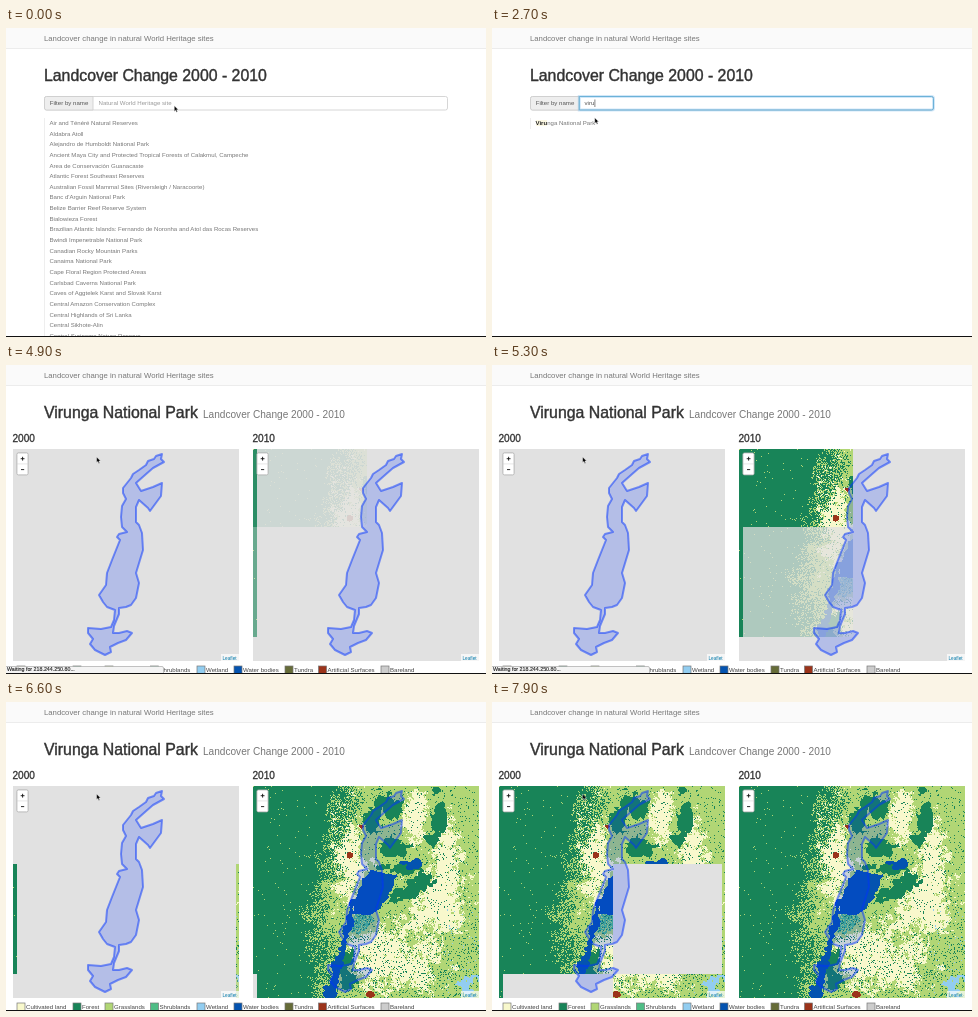
Recreate the animation shown at these times as an HTML page with a canvas. Size 480 by 309 pixels, loop 8 s.

```html
<!DOCTYPE html>
<html lang="en">
<head>
<meta charset="utf-8">
<title>Landcover change</title>
<style>
html, body { margin: 0; width: 100%; height: 100%; overflow: hidden; background: #fff; }
#stage { position: absolute; left: 0; top: 0; width: 480px; height: 309px; overflow: hidden; background: #fff; }
#stage, text { font-family: "Liberation Sans", Arial, sans-serif; }
svg { position: absolute; left: 0; top: 0; overflow: hidden; }
.title { font-size: 15.85px; fill: #333; stroke: #333; stroke-width: .4px; }
.sub { font-size: 10.1px; fill: #777; }
.year { font-size: 10.1px; fill: #333; stroke: #333; stroke-width: .3px; }
.nav { font-size: 7.76px; fill: #777; }
.small { font-size: 6.1px; fill: #444; }
#list { position: absolute; left: 38px; top: 90px; padding-left: 4.5px; border-left: 1px solid #eee;
  font-size: 6.05px; line-height: 10.65px; color: #777; white-space: nowrap; }
#list div { height: 10.65px; }
#list mark { font-weight: bold; color: #222; background: #fcf8e3; }
.map { position: absolute; top: 84px; width: 226px; height: 212px; background: #e1e1e1; overflow: hidden; }
.map canvas { position: absolute; left: 0; top: 0; }
</style>
</head>
<body>
<div id="stage">
  <svg id="nav" width="480" height="309">
    <rect width="480" height="20.5" fill="#fafafa"/>
    <rect y="20" width="480" height="1" fill="#ececec"/>
    <text class="nav" x="38" y="12.8">Landcover change in natural World Heritage sites</text>
  </svg>

  <div id="search">
    <svg width="480" height="309">
      <text class="title" x="38" y="52.5">Landcover Change 2000 - 2010</text>
      <rect x="38.5" y="68.5" width="403" height="13.5" rx="2" fill="#fff" stroke="#ccc" stroke-width=".8"/>
      <path d="M87 68.5H40.5a2 2 0 0 0-2 2v9.500a2 2 0 0 0 2 2H87z" fill="#eee" stroke="#ccc" stroke-width=".8"/>
      <text class="small" x="43.7" y="77.400" style="fill:#555">Filter by name</text>
      <g id="focus" fill="none">
        <path d="M87.300 68.500H439.500a2 2 0 0 1 2 2v9.500a2 2 0 0 1-2 2H87.300z" stroke="#66afe9" stroke-opacity=".3" stroke-width="3"/>
        <path d="M87.300 68.500H439.500a2 2 0 0 1 2 2v9.500a2 2 0 0 1-2 2H87.300z" stroke="#6cb2d8"/>
      </g>
      <text id="field" class="small" x="92.500" y="77.400"></text>
      <rect id="caret" y="71.500" width=".6" height="7.500" fill="#333"/>
    </svg>
    <div id="list"></div>
  </div>

  <div id="detail">
    <svg width="480" height="309">
      <text class="title" x="38" y="52.5">Virunga National Park</text>
      <text class="sub" x="197" y="52.5">Landcover Change 2000 - 2010</text>
      <text class="year" x="6.5" y="77.300">2000</text>
      <text class="year" x="246.500" y="77.300">2010</text>
      <g id="legend"></g>
    </svg>
    <div id="maps"></div>
  </div>

  <svg width="480" height="309">
    <g id="status">
      <rect x="-2" y="301.500" width="159.500" height="9" rx="1.500" fill="#f4f4f4" stroke="#aaa" stroke-width=".7"/>
      <text x="1" y="306.300" font-size="5.3" fill="#222" stroke="#222" stroke-width=".12">Waiting for 218.244.250.80...</text>
    </g>
    <rect y="308" width="480" height="1" fill="#111"/>
    <path id="cursor" d="M0 0V5.600L1.300 4.400L2.200 6.400L3.200 6L2.300 4H4z" fill="#000" stroke="#fff" stroke-width=".4"/>
  </svg>
</div>

<script>
const $ = id => document.getElementById(id);
const LOOP = 8000, W = 226, H = 212, TILE = 109.7;
const clamp = v => Math.max(0, Math.min(1, v));
const show = (el, on) => { el.style.visibility = on ? 'visible' : 'hidden'; };

const SITES = `Air and Ténéré Natural Reserves
Aldabra Atoll
Alejandro de Humboldt National Park
Ancient Maya City and Protected Tropical Forests of Calakmul, Campeche
Area de Conservación Guanacaste
Atlantic Forest Southeast Reserves
Australian Fossil Mammal Sites (Riversleigh / Naracoorte)
Banc d'Arguin National Park
Belize Barrier Reef Reserve System
Bialowieza Forest
Brazilian Atlantic Islands: Fernando de Noronha and Atol das Rocas Reserves
Bwindi Impenetrable National Park
Canadian Rocky Mountain Parks
Canaima National Park
Cape Floral Region Protected Areas
Carlsbad Caverns National Park
Caves of Aggtelek Karst and Slovak Karst
Central Amazon Conservation Complex
Central Highlands of Sri Lanka
Central Sikhote-Alin
Central Suriname Nature Reserve
Cerrado Protected Areas: Chapada dos Veadeiros and Emas National Parks
Dinosaur Provincial Park
Discovery Coast Atlantic Forest Reserves
Dja Faunal Reserve
Everglades National Park
Mosi-oa-Tunya / Victoria Falls
Mount Nimba Strict Nature Reserve
Nanda Devi and Valley of Flowers National Parks
Plitvice Lakes National Park
Río Plátano Biosphere Reserve
Selous Game Reserve
Sinharaja Forest Reserve
Srebarna Nature Reserve
Virgin Komi Forests
Virunga National Park
Whale Sanctuary of El Vizcaino`.split('\n');

const COLORS = {
  cultivated: '#f8f8cc', forest: '#188458', grass: '#b1d675', shrub: '#4fbd86', wetland: '#92cdf0',
  water: '#0453b0', tundra: '#666c38', artificial: '#9b331a', bare: '#cccccc'
};

// Legend: label, swatch x, colour
[['Cultivated land', 11, 'cultivated'], ['Forest', 67, 'forest'], ['Grasslands', 99, 'grass'],
 ['Shrublands', 144.5, 'shrub'], ['Wetland', 191, 'wetland'], ['Water bodies', 228, 'water'],
 ['Tundra', 279, 'tundra'], ['Artificial Surfaces', 312.500, 'artificial'], ['Bareland', 375, 'bare']
].forEach(([label, x, kind]) => {
  $('legend').innerHTML += `<rect x="${x}" y="301" width="8" height="8" fill="${COLORS[kind]}" stroke="#777" stroke-width=".7"/>
    <text class="small" x="${x + 9}" y="307">${label}</text>`;
});

// ---- land cover, one class per pixel ----
const rnd = (x, y) => {
  let n = Math.imul(x, 374761393) + Math.imul(y, 668265263) | 0;
  n = Math.imul(n ^ n >>> 13, 1274126177);
  return ((n ^ n >>> 16) >>> 0) / 4294967296;
};
const noise = (x, y, size) => {
  x /= size; y /= size;
  const i = Math.floor(x), j = Math.floor(y), u = x - i, v = y - j;
  const mix = (a, b, k) => a + (b - a) * k;
  return mix(mix(rnd(i, j), rnd(i + 1, j), u), mix(rnd(i, j + 1), rnd(i + 1, j + 1), u), v) - .5;
};
const along = (pts, y) => {
  let k = 1;
  while (k < pts.length - 1 && pts[k][0] < y) k++;
  const [a, b] = [pts[k - 1], pts[k]];
  return a[1] + (b[1] - a[1]) * (y - a[0]) / (b[0] - a[0]);
};
const depth = (x, y, [cx, cy, rx, ry, turn = 0]) => {
  const c = Math.cos(turn), s = Math.sin(turn), dx = x - cx, dy = y - cy;
  return 1 - Math.hypot((dx * c + dy * s) / rx, (dy * c - dx * s) / ry);
};
const deepest = (x, y, blobs) => Math.max(...blobs.map(b => depth(x, y, b)));

const EDGE = [[0, 94], [40, 82], [70, 76], [110, 64], [150, 62], [180, 68], [212, 76]];
const RIVER = [[112, 104], [132, 94], [150, 90], [170, 86], [190, 80], [212, 76]];
const WOODS = [[184, 34, 8, 18, .2], [178, 54, 7, 8], [142, 62, 13, 9], [157, 103, 23, 8, -.5],
  [150, 82, 17, 5], [134, 18, 14, 11], [118, 34, 8, 12], [90, 178, 10, 14], [96, 196, 8, 9], [182, 5, 5, 5]];
const FIELDS = [[164, 30, 11, 32], [192, 66, 15, 32], [186, 116, 25, 30], [125, 170, 32, 26], [96, 75, 14, 50], [160, 178, 26, 22]];
const LAKE = new Path2D('M109 92L119 84L133 87L143 88L139 101L133 113L125 123L115 129L103 128L100 121L105 106Z');

const land = document.createElement('canvas');
land.width = W; land.height = H;
const pen = land.getContext('2d');

function cover(x, y) {
  const r = rnd(x, y), n = noise(x, y, 10), m = noise(x, y, 3), rough = n + m;
  if (deepest(x, y, [[96, 69, 3.500, 3.200], [108, 40, 2.200, 2], [117, 208, 4, 3]]) + m * .4 > 0) return 'artificial';
  if (pen.isPointInPath(LAKE, x + m * 3, y + n * 3)) return 'water';
  if (deepest(x, y, [[161, 78, 8, 5, -.3], [151, 76, 5, 2]]) + m * .5 > 0) return 'water';
  if (y > 112 && Math.abs(x - along(RIVER, y) + n * 10) < 4 + m * 5) return 'water';
  if (depth(x, y, [107, 137, 14, 9, -.4]) + rough * .6 > 0) return r < .6 ? 'shrub' : r < .85 ? 'grass' : 'forest';
  const west = x - along(EDGE, y) + n * 28 + m * 10;
  const open = clamp((west + 14) / 32);
  if (r > open) return rnd(y, x) < .008 ? 'grass' : 'forest';
  if (deepest(x, y, WOODS) + rough * .9 > 0 && r < .95) return 'forest';
  if (depth(x, y, [214, 200, 12, 13]) + rough > .3) return 'wetland';
  if (x > 190 && y > 120 && r < .015) return 'wetland';
  if (r > .94 - (y > 150 ? .04 : 0)) return 'forest';
  const field = deepest(x, y, FIELDS) + rough * 1.300 + (rnd(y, x) - .5) * .6;
  return field > .05 ? 'cultivated' : 'grass';
}
for (let y = 0; y < H; y++) for (let x = 0; x < W; x++) {
  pen.fillStyle = COLORS[cover(x, y)];
  pen.fillRect(x, y, 1, 1);
}

// ---- maps ----
const PARK = 'M149 5L143 7L141 10L135 12L133 16L126 21L120 25L118 29L110 39V44L113 50L109 57L108 68L109 78L114 83L106 85L104 88L107 91L105 96L99 111L94 124L93 136L86 146L90 153L94 158L102 161L101 171L98 178L88 180L75 179V184L80 190L77 195L82 201L92 206L98 203L97 198L105 194L113 191L119 184L114 182L106 184L100 184L101 177L106 165V159L113 158L118 156L123 149L126 134L123 124L130 101L129 84L126 76L123 73V58L126 51L135 59L137 62L148 47L149 34L140 38L128 42L123 34L132 26L140 19L151 13L148 10Z';

// Tile arrivals: column, row, time
const ARRIVALS = [
  [[-1, 1, 5700], [2, 1, 6400], [2, 2, 6450], [-1, 0, 6700], [0, 0, 6850], [2, 0, 7000], [1, 0, 7100],
   [0, 1, 7350], [1, 2, 7500], [-1, 2, 7600]],
  [[-1, 0, 4720], [-1, 1, 4780], [0, 0, 4880], [0, 1, 5250], [1, 2, 5600], [2, 0, 5650], [2, 1, 5660], [2, 2, 5680],
   [1, 0, 6000], [1, 1, 6150], [0, 2, 6300], [-1, 2, 6600]]
];
const maps = ARRIVALS.map((tiles, i) => {
  const box = document.createElement('div');
  box.className = 'map';
  box.style.left = 7 + 240 * i + 'px';
  box.innerHTML = `<canvas width="${W}" height="${H}"></canvas>
    <svg width="${W}" height="${H}">
      <path class="park" d="${PARK}" fill="#03f" fill-opacity=".2" stroke="#03f" stroke-opacity=".5" stroke-width="2" stroke-linejoin="round"/>
      <rect x="3.900" y="3.900" width="11.200" height="22" rx="1.500" fill="#fff" stroke="#aaa" stroke-width=".8"/>
      <path d="M4 14.900h11" stroke="#ccc" stroke-width=".5"/>
      <path d="M7.700 9.700h3.800M9.600 7.800v3.800M8 20.600h3.200" stroke="#111" stroke-width=".9"/>
      <rect x="208" y="205" width="18" height="7" fill="#fff" fill-opacity=".7"/>
      <text x="209.500" y="210.600" font-size="4.700" fill="#0078a8">Leaflet</text>
    </svg>`;
  $('maps').append(box);
  return { tiles, ctx: box.querySelector('canvas').getContext('2d'), park: box.querySelector('.park') };
});

function drawMap({ tiles, ctx, park }, t) {
  ctx.clearRect(0, 0, W, H);
  for (const [col, row, at] of tiles) {
    if (t <= at) continue;
    const x = Math.max(0, Math.round(4 + col * TILE)), y = Math.max(0, Math.round(78 + (row - 1) * TILE));
    const w = Math.min(W, Math.round(4 + (col + 1) * TILE)) - x, h = Math.min(H, Math.round(78 + row * TILE)) - y;
    ctx.globalAlpha = clamp((t - at) / 200);
    ctx.drawImage(land, x, y, w, h, x, y, w, h);
  }
  park.style.display = t >= 4600 ? '' : 'none';
}

// ---- search page ----
const TYPED = [[1000, 'v'], [1300, 'vi'], [1600, 'vir'], [2100, 'viru']];
const FILTERED = [[1200, 'v'], [1400, 'vi'], [1700, 'vir'], [2200, 'viru']];
const latest = (steps, t) => steps.reduce((now, [at, text]) => t >= at ? text : now, '');

let listed = null;
function fillList(query) {
  if (query === listed) return;
  listed = query;
  const hit = name => name.toLowerCase().indexOf(query);
  $('list').innerHTML = SITES.filter(name => hit(name) >= 0).slice(0, 21).map(name => {
    const a = hit(name), b = a + query.length;
    return `<div>${query ? name.slice(0, a) + '<mark>' + name.slice(a, b) + '</mark>' + name.slice(b) : name}</div>`;
  }).join('');
}

function drawSearch(t) {
  const typed = latest(TYPED, t), focus = clamp((t - 200) / 300) * clamp((3200 - t) / 300);
  $('field').textContent = typed || 'Natural World Heritage site';
  $('field').style.fill = typed ? '#555' : '#999';
  $('focus').style.opacity = focus;
  $('caret').setAttribute('x', 92.500 + (typed ? $('field').getComputedTextLength() + .3 : -.3));
  $('caret').style.opacity = focus > .5 ? 1 : 0;
  fillList(latest(FILTERED, t));
}

function draw(t) {
  const search = t < 3400, detail = t >= 3800;
  show($('nav'), search || detail);
  show($('search'), search);
  show($('detail'), detail);
  show($('maps'), t >= 4100);
  show($('status'), t >= 2900 && t < 3400 || t >= 4300 && t < 5500);
  show($('cursor'), t < 500 || t >= 2400);
  const k = clamp((t - 2400) / 400), ease = k * k * (3 - 2 * k);
  $('cursor').setAttribute('transform', `translate(${168.300 - 77.700 * ease} ${77.800 + 14.200 * ease})`);
  if (search) drawSearch(t);
  if (detail) maps.forEach(map => drawMap(map, t));
}

const start = performance.now();
function tick() {
  const t = (performance.now() - start) % LOOP;
  draw(Math.floor(t / 100) * 100);
  requestAnimationFrame(tick);
}
tick();
</script>
</body>
</html>
```
